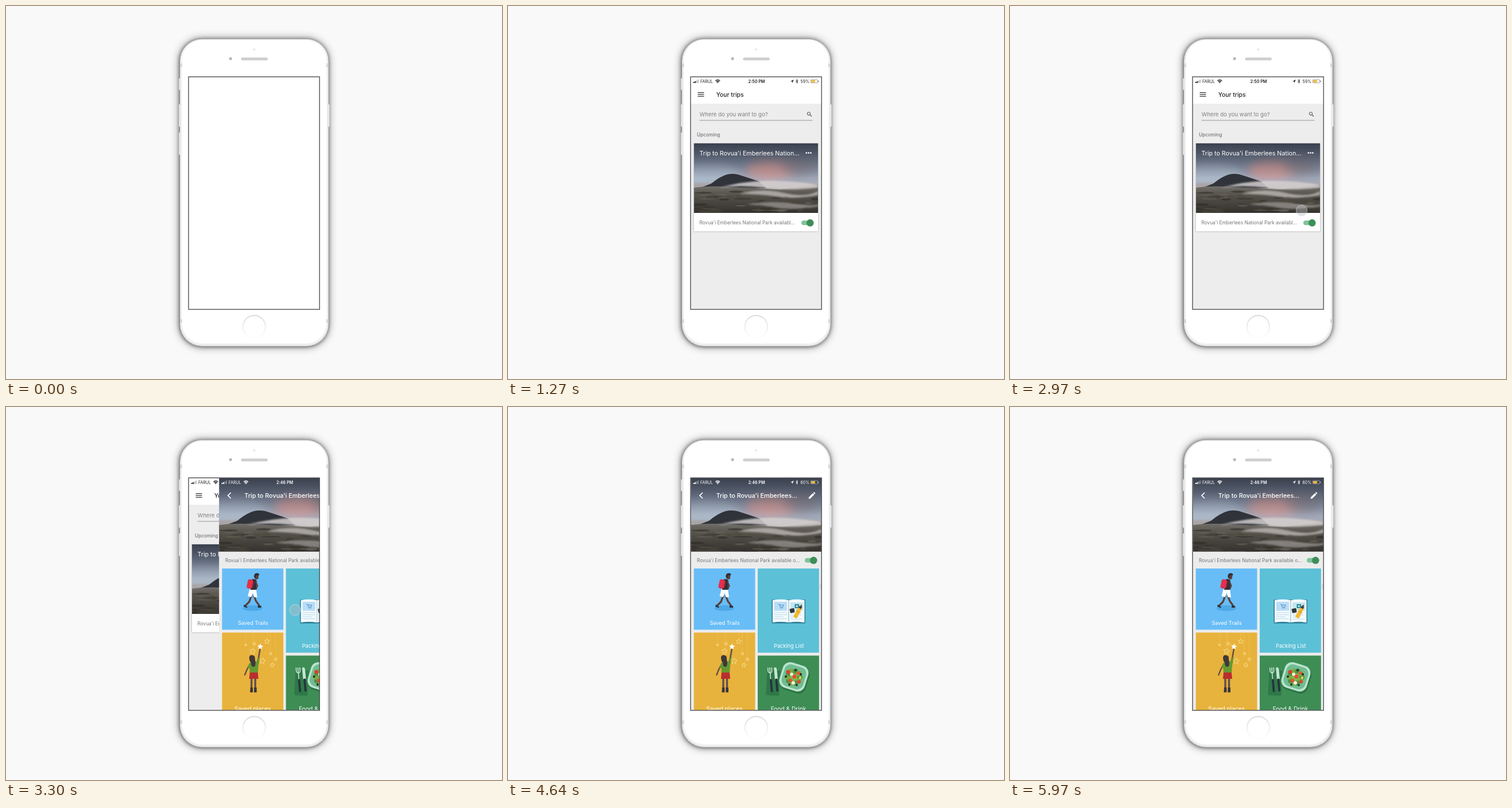
Animation, 864 px wide and 649 px high, one loop 6000 ms. Source, as an HTML page:

```html
<!DOCTYPE html>
<html lang="en">
<head>
<meta charset="utf-8">
<title>Trip planner on a phone</title>
<style>
html, body { margin: 0; width: 100%; height: 100%; overflow: hidden; background: #f9f9f9; }
svg { display: block; width: 864px; height: 649px; }
text { font-family: Inter, Roboto, sans-serif; }
</style>
</head>
<body>
<svg id="stage" viewBox="0 0 864 649" xmlns="http://www.w3.org/2000/svg"></svg>
<script>
const LOOP = 6000;
const PLACE = "Rovua'i Emberlees";
const CARRIER = "FARUL";

const rect = (x, y, w, h, fill, extra = "") =>
  `<rect x="${x}" y="${y}" width="${w}" height="${h}" fill="${fill}" ${extra}/>`;
const circle = (x, y, r, fill, extra = "") =>
  `<circle cx="${x}" cy="${y}" r="${r}" fill="${fill}" ${extra}/>`;
const oval = (x, y, rx, ry, fill, extra = "") =>
  `<ellipse cx="${x}" cy="${y}" rx="${rx}" ry="${ry}" fill="${fill}" ${extra}/>`;
const shape = (d, fill, extra = "") => `<path d="${d}" fill="${fill}" ${extra}/>`;
const line = (d, stroke, width = 1, extra = "") =>
  `<path d="${d}" fill="none" stroke="${stroke}" stroke-width="${width}" ${extra}/>`;
const label = (x, y, size, fill, str, extra = "") =>
  `<text x="${x}" y="${y}" font-size="${size}" fill="${fill}" ${extra}>${str}</text>`;
const centered = (x, y, size, str) => label(x, y, size, "#fff", str, 'text-anchor="middle"');
const gradient = (id, stops, dir = 'x1="0" y1="0" x2="0" y2="1"') =>
  `<linearGradient id="${id}" ${dir}>${stops.map(([at, color, alpha = 1]) =>
    `<stop offset="${at}" stop-color="${color}" stop-opacity="${alpha}"/>`).join("")}</linearGradient>`;
const blur = (id, amount) =>
  `<filter id="${id}" x="-50%" y="-50%" width="200%" height="200%"><feGaussianBlur stdDeviation="${amount}"/></filter>`;

function star(cx, cy, r, filled) {
  const points = Array.from({ length: 10 }, (_, i) => {
    const a = -Math.PI / 2 + 0.12 + i * Math.PI / 5;
    const d = i % 2 ? r * 0.45 : r;
    return `${(cx + d * Math.cos(a)).toFixed(1)},${(cy + d * Math.sin(a)).toFixed(1)}`;
  }).join(" ");
  return `<polygon points="${points}" fill="${filled ? "#fff" : "none"}" stroke="#fbe3a0" stroke-width="${filled ? 0 : 0.8}"/>`;
}

function random(seed) {
  return () => (seed = (seed * 16807) % 2147483647) / 2147483647;
}

// Landscape in a 216 x 121 box
function landscape() {
  const rnd = random(71);
  let rocks = "";
  for (let i = 0; i < 60; i++) {
    const y = 84 + rnd() * 36;
    rocks += oval((rnd() * 216).toFixed(1), y.toFixed(1), (4 + rnd() * 13).toFixed(1), (0.7 + rnd() * 1.8).toFixed(1),
      ["#2d2a27", "#68645a", "#4b4a3c", "#37342f"][i % 4], 'opacity=".6"');
  }
  return rect(0, 0, 216, 121, "url(#sky)") +
    oval(28, 57, 55, 20, "#aebdce", 'filter="url(#soft8)" opacity=".75"') +
    oval(132, 46, 42, 17, "#d99c98", 'filter="url(#soft8)" opacity=".8"') +
    oval(182, 40, 30, 16, "#8d8188", 'filter="url(#soft8)" opacity=".6"') +
    rect(-5, 69, 226, 12, "#a9a5a7", 'filter="url(#soft2)"') +
    shape("M12 77 L30 70 Q46 57 58 54 Q66 52 76 54 Q92 59 113 66 L126 78Z", "#30333a") +
    shape("M0 77 Q30 73 60 76 L150 80 L216 72 V121 H0Z", "url(#land)") + rocks +
    shape("M44 77 Q86 66 124 65 Q164 64 216 72 L216 77 Q160 83 120 77 Q82 72 44 77Z", "#d5d0d0", 'filter="url(#soft2)" opacity=".85"') +
    shape("M78 88 Q116 77 156 86 T216 83 L216 90 Q174 98 140 92 Q112 88 78 88Z", "#bcb7b4", 'filter="url(#soft2)" opacity=".8"') +
    shape("M92 106 Q136 99 178 105 T216 103 V110 Q164 118 134 110Z", "#a09b98", 'filter="url(#soft2)" opacity=".7"') +
    rect(0, 0, 216, 60, "url(#shade)");
}

function statusBar(color, faint, time, charge) {
  const bars = [2, 3.2, 4.6, 6].map((h, i) =>
    rect(322.8 + i * 2.5, 134 - h, 1.9, h, i < 2 ? color : faint)).join("");
  return bars + label(335, 133.5, 7, color, CARRIER) +
    line("M361.3 130.2 Q365.3 126.6 369.3 130.2 M362.8 131.9 Q365.3 129.7 367.8 131.9", color, 1.3) +
    shape("M363.8 132.8 Q365.3 131.5 366.8 132.8 L365.3 134.5Z", color) +
    label(433, 133.5, 7.2, color, time, 'font-weight="600" text-anchor="middle"') +
    shape("M492.3 131 L497.8 128 L495.3 134 L494.9 131.4Z", color) +
    line("M501.3 129.2 L505 132.5 L503.2 134.3 V127.7 L505 129.5 L501.3 132.8", color, 0.8) +
    label(509.5, 133.5, 7, color, charge) +
    rect(527.2, 128.2, 12.4, 5.6, "none", `rx="1.4" stroke="${color}" stroke-width=".6" opacity=".7"`) +
    rect(528.1, 129.1, 6.8, 3.8, "#f4bd35") + rect(540.3, 129.9, 0.8, 2.2, color);
}

const toggle = (x, y) =>
  rect(x, y - 4, 20, 8, "#80c39c", 'rx="4"') +
  circle(x + 15.3, y + 0.6, 6.4, "#000", 'opacity=".14"') + circle(x + 15.3, y, 6.2, "#3c8f56");

function tripList() {
  return rect(318, 123, 229, 406, "#ededed") + rect(318, 123, 229, 47, "#fff") +
    statusBar("#222", "#bbb", "2:50 PM", "59%") +
    line("M330.5 150.7 H341.5 M330.5 153.9 H341.5 M330.5 157.1 H341.5", "#333", 1.2) +
    label(362.7, 157.7, 10.4, "#222", "Your trips", 'font-weight="500"') +
    label(333.7, 192, 9.6, "#808080", "Where do you want to go?") +
    line("M333.5 199 H530.5", "#8c8c8c", 0.9) +
    circle(524, 187.3, 2.6, "none", 'stroke="#666" stroke-width="1.1"') + line("M526 189.3 L529 192.3", "#666", 1.4) +
    label(329, 227, 8.25, "#757575", "Upcoming", 'font-weight="500"') +
    rect(323.6, 239, 216.8, 153.6, "#000", 'opacity=".22" filter="url(#soft1)"') +
    rect(324, 239, 216, 153, "#fff") +
    '<use href="#photo" transform="translate(324 239)"/>' +
    label(333.5, 259.6, 10.7, "#fff", `Trip to ${PLACE} Nation...`) +
    [519.8, 523.6, 527.4].map(x => circle(x, 255.6, 1.35, "#fff")).join("") +
    label(333.5, 380.4, 8.3, "#757575", `${PLACE} National Park availabl...`) + toggle(511, 377.3);
}

function hiker() {
  return oval(377, 350, 17, 5, "#4da8e6") +
    line("M375 328 L371 339 L364 346", "#5b4038", 3.2) + line("M379 328 L383 338 L389 346", "#5b4038", 3.2) +
    shape("M362 344 L368 348 L367 349.5 L361 347Z M386 345.5 L392 346 V349 H386Z", "#2c2b33") +
    shape("M372 316 H383 L385 331 H379.5 L377.5 323 L374.5 331 L368.5 329Z", "#fff") +
    shape("M374 301 Q380 297 384 302 L383.5 318 H373Z", "#30303a") +
    line("M382 303 L385.5 311 L383 317", "#5b4038", 2.2) +
    rect(367.5, 300, 9.5, 16, "#e52f4b", 'rx="3.5" transform="rotate(12 372 308)"') +
    line("M376.5 301 Q380.5 304 377 314", "#b81f38", 1) +
    oval(383.8, 295.4, 3.5, 4.5, "#5b4038") + shape("M379.4 296 Q379 289 384.5 289 L388 290 L388.5 293 L383 293 L382 298Z", "#302d35");
}

function stargazer() {
  const strings = [[365, 411], [377, 418], [380, 409], [402, 403], [408, 426], [417, 436]]
    .map(([x, y]) => `M${x} 393 V${y}`).join(" ");
  const outlines = [[377, 425, 5.5], [402, 408, 4.8], [365, 414, 2.3], [380, 412, 3], [394, 442, 5.6],
    [408.5, 429, 2.7], [417, 439, 3.1], [411, 449, 4.2]];
  return line(strings, "#f2ca6c", 0.4) + outlines.map(s => star(...s)).join("") +
    line("M375 473 V490 M381.5 473 V490", "#65504a", 3.5) +
    shape("M373 488 H377.4 V496.5 H372.5Z M379.6 488 H384 V496.5 H379.2Z", "#38343d") +
    line("M384.5 447 L387.5 435 L390 421", "#65504a", 2.6) + line("M373 446 L367 457 L363 467", "#65504a", 2.4) +
    shape("M371 446 Q378 441 384 443 L386 436 L389.5 437 L387 450 L386 463 H372Z", "#659832") +
    shape("M373 444 L368 452 L371.5 455 L375 449Z", "#659832") +
    shape("M372 462 H386 L387 473 H371Z", "#bb2d2f") +
    shape("M371 437 Q371 431 377 432 Q382 433 381 439 Q383 446 381 451 Q377 454 374.5 449 Q375 445 372 442Z", "#403739") +
    star(390.2, 417, 5.6, true);
}

function notebook() {
  return rect(459.5, 335, 58.5, 41.5, "#2a7c95", 'rx="1.5"') +
    shape("M461 336 Q475 333.5 488.7 336 V375 Q475 372.5 461 375Z M489.2 336 Q503 333.5 516.5 336 V375 Q503 372.5 489.2 375Z", "#f3fafd") +
    rect(464, 339, 22, 15.5, "#b9dcf6") +
    line("M471 343.5 H473 L474.5 348.5 H478.5 L480 344.7 H473.6", "#4b8bc4", 1) +
    circle(475, 350.3, 0.8, "#4b8bc4") + circle(478, 350.3, 0.8, "#4b8bc4") +
    line("M464 358 H486 M464 361.5 H486 M464 365 H480 M464 368.5 H486 M492 358.5 H511 M492 362 H511 M492 365.5 H506 M492 369 H511", "#b9d9e8", 1.1) +
    line("M489 336 V375", "#b5cdd8", 1) +
    rect(492, 340, 22, 14, "#c4e6ec") + rect(499.5, 343, 7.5, 7, "#24899a", 'rx="1"') +
    line("M501.2 346.5 H505.3 M503.25 344.5 V348.5", "#fff", 1.1) +
    rect(491, 350.5, 8, 7.5, "#2f3439", 'rx="1" transform="rotate(-12 495 354)"') +
    `<g transform="rotate(28 505 357)">${rect(501.5, 349, 6.8, 19, "#f2b82f", 'rx="1.5"') +
      rect(502.4, 345.5, 5, 4, "#3b3b3b") + rect(503.9, 343, 2, 3, "#3b3b3b") + rect(501.5, 356, 6.8, 1, "#d39521")}</g>`;
}

function salad() {
  const dots = [[488, 461, 3.4, "#d8402f"], [492, 476, 3.2, "#e35336"], [507, 478, 3.1, "#dc4632"], [506, 463, 3, "#e55b3a"],
    [499, 469, 3.5, "#e84b38"], [484, 469, 2, "#252c2a"], [501, 458, 2.1, "#252c2a"], [510, 465, 2, "#252c2a"],
    [490, 483, 1.9, "#252c2a"], [503, 484, 1.8, "#252c2a"], [497, 480, 3, "#fff1df"], [494, 465, 2.7, "#fff1df"], [509, 471, 2.2, "#f2d14d"]];
  const leaves = Array.from({ length: 10 }, (_, i) =>
    circle((497.5 + 11 * Math.cos(i * 0.63)).toFixed(1), (470 + 11 * Math.sin(i * 0.63)).toFixed(1), 4.6, i % 2 ? "#79ad42" : "#4c9347")).join("");
  return rect(450.5, 458, 23, 44, "#2f7848", 'transform="rotate(3 462 480)"') +
    `<g transform="rotate(-5 461 475)">${
      line("M454.5 453 V460 Q458 465 461 460 V453 M457.7 453 V474", "#c4e6d2", 1.6) +
      shape("M465 474 V454 Q470 452 470 459 V474Z", "#c4e6d2") +
      rect(456, 473, 3.8, 23, "#25353d", 'rx="1.9"') + rect(465.6, 473, 3.8, 23, "#25353d", 'rx="1.9"')}</g>` +
    rect(476, 449, 47, 47, "#2d7545", 'rx="13" transform="rotate(17 499 472)"') +
    rect(475, 446.5, 46, 46, "#b9e4cd", 'rx="13" transform="rotate(17 498 469.5)"') +
    rect(478.5, 450, 39, 39, "#71bc92", 'rx="11" transform="rotate(17 498 469.5)"') +
    circle(498, 470, 13, "#80b84c") + leaves + dots.map(d => circle(...d)).join("");
}

function tripDetail() {
  return rect(318.5, 123, 229, 406, "#ececec") +
    '<use href="#photo" transform="translate(318.5 124) scale(1.056)"/>' +
    statusBar("#fff", "#8b8e96", "2:46 PM", "60%") +
    line("M339 149 L334 154 L339 159", "#fff", 1.7) +
    label(362.7, 157.8, 10.8, "#fff", `Trip to ${PLACE}...`, 'font-weight="500"') +
    shape("M523.8 157.2 L531 150 L533.4 152.4 L526.2 159.6 H523.8Z M531.7 149.3 L532.8 148.2 Q533.4 147.8 534 148.4 L535 149.4 Q535.5 150 535.1 150.6 L534.1 151.7Z", "#fff") +
    label(329, 270, 8.35, "#757575", `${PLACE} National Park available o...`) + toggle(517, 266.8) +
    rect(323.7, 281, 106.8, 106.5, "#68bdf6") + hiker() + centered(377.6, 379, 9.15, "Saved Trails") +
    rect(435, 281, 106.8, 146.5, "#5cc0d7") + notebook() + centered(489.3, 418.5, 9.2, "Packing List") +
    rect(323.7, 392.5, 106.8, 137, "#e8b33c") + stargazer() + centered(377, 529, 10.1, "Saved places") +
    rect(435, 432.5, 106.8, 97, "#3e8d55") + salad() + centered(488.5, 529, 10.2, "Food &amp; Drink");
}

function phone() {
  const button = (x, y, h) => rect(x, y, 3, h, "#f0f0f0", 'rx="1" stroke="#bbb" stroke-width=".6"');
  const antennas = [100, 545].map(y => rect(303, y, 3.6, 6.5, "#d6d6d6") + rect(558, y, 3.6, 6.5, "#d6d6d6")).join("");
  return rect(302, 57, 260, 536, "#000", 'rx="39" opacity=".42" filter="url(#soft8)"') +
    rect(302, 57.5, 260, 535.5, "#000", 'rx="39" opacity=".5" filter="url(#soft4)"') +
    button(301.2, 126, 20) + button(301.2, 171, 39) + button(301.2, 220, 39) + button(560.5, 171, 39) +
    rect(303, 57.5, 258.8, 534.5, "#e3e3e3", 'rx="38"') +
    rect(304.5, 58.5, 255.8, 531, "#f3f3f3", 'rx="37"') +
    rect(306.5, 59, 251.8, 528, "#fff", 'rx="36"') + antennas +
    circle(432.3, 75.6, 2.3, "#ececec") +
    circle(391, 91.6, 2.9, "#d2d2d2") + oval(391.5, 91.6, 1.1, 1.7, "#777") + circle(391.9, 91.3, 0.6, "#fff") +
    rect(410, 90.2, 45.3, 3.8, "#d3d3d3", 'rx="1.6" stroke="#aaa" stroke-width=".6"') +
    circle(432.4, 558, 19.6, "#fff", 'stroke="url(#home)" stroke-width="2"');
}

document.getElementById("stage").innerHTML = `<defs>
  ${gradient("sky", [[0, "#67758c"], [0.3, "#8592a9"], [0.62, "#adb1bd"]])}
  ${gradient("land", [[0, "#77736f"], [0.35, "#56534b"], [1, "#35322e"]])}
  ${gradient("shade", [[0, "#23252d", 0.65], [1, "#23252d", 0]])}
  ${gradient("home", [[0, "#d9d9d9"], [0.5, "#eeeeee"], [1, "#fdfdfd"]])}
  ${blur("soft1", 0.9)}${blur("soft2", 1.6)}${blur("soft4", 3)}${blur("soft8", 8)}
  <clipPath id="screen">${rect(318, 123.5, 228.3, 404, "#fff")}</clipPath>
  <clipPath id="photoEdge">${rect(0, 0, 216, 121, "#fff")}</clipPath>
  <g id="photo" clip-path="url(#photoEdge)">${landscape()}</g>
</defs>
${rect(0, 0, 864, 649, "#f9f9f9")}${phone()}
<g clip-path="url(#screen)">
  <g id="list">${tripList()}</g>
  <g id="detail">${tripDetail()}</g>
  <g id="touch">${circle(0, 0, 9.6, "#b9bcc0", 'fill-opacity=".42" stroke="#e2e2e2" stroke-opacity=".65" stroke-width=".9"')}</g>
</g>
${rect(318, 123.3, 228.2, 404.5, "none", 'stroke="#505054" stroke-width="1.4"')}`;

const [list, detail, touch] = ["list", "detail", "touch"].map(id => document.getElementById(id));
const progress = (t, from, to) => Math.min(1, Math.max(0, (t - from) / (to - from)));
const easeOut = p => 1 - (1 - p) ** 3;
const easeInOut = p => p * p * (3 - 2 * p);
const mix = (a, b, p) => a + (b - a) * p;

const touchPath = [[1550, 556, 312], [2180, 508, 356], [3000, 508, 356], [3300, 503.5, 353], [3680, 552.5, 312]];

function touchAt(t) {
  let [, x, y] = touchPath[0];
  for (let i = 1; i < touchPath.length; i++) {
    const [from] = touchPath[i - 1], [to, nx, ny] = touchPath[i];
    const p = easeInOut(progress(t, from, to));
    x = mix(x, nx, p);
    y = mix(y, ny, p);
  }
  return [x, y];
}

function draw(t) {
  const push = easeOut(progress(t, 3100, 3620));
  list.setAttribute("opacity", easeInOut(progress(t, 460, 770)));
  detail.setAttribute("transform", `translate(${228 * (1 - push)} 0)`);
  detail.setAttribute("visibility", push > 0 ? "visible" : "hidden");
  touch.setAttribute("transform", `translate(${touchAt(t).join(" ")})`);
  touch.setAttribute("visibility", t > 1550 ? "visible" : "hidden");
}

const start = performance.now();
function tick() {
  draw((performance.now() - start) % LOOP);
  requestAnimationFrame(tick);
}
draw(0);
requestAnimationFrame(tick);
</script>
</body>
</html>
```
